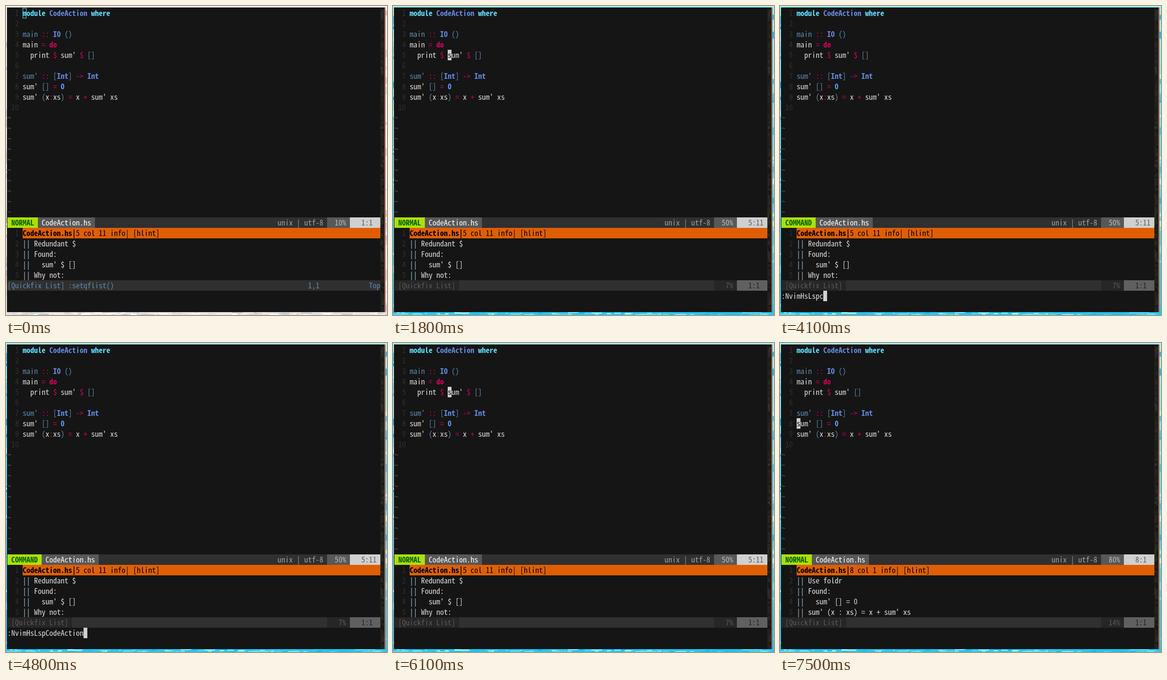
An HTML page with a canvas for the animation above (8 s loop, 801 px wide and 649 px high).

```html
<!DOCTYPE html>
<html lang="en">
<head>
<meta charset="utf-8">
<title>Code action in a terminal editor</title>
<style>
  html, body { margin: 0; width: 100%; height: 100%; overflow: hidden; background: #151515; }
  canvas { display: block; }
</style>
</head>
<body>
<canvas id="screen" width="801" height="649"></canvas>
<script>
const ctx = document.getElementById('screen').getContext('2d');
const LOOP = 8000, CELL_W = 8, CELL_H = 22, LEFT = 3, TOP = 4, COLS = 98;
const FAMILY = '"Noto Sans Mono CJK JP", "Noto Sans Mono", monospace';
const BG = '#151515', FG = '#dcdcdc', BAR = '#303030';

// Pick the font size whose advance equals one cell.
ctx.font = `100px ${FAMILY}`;
const fontSize = 100 * CELL_W / ctx.measureText('0').width;

// Token styles: [colour, bold]
const STYLES = {
  w: [FG], k: ['#5fdfff', true], T: ['#6488dc', true], s: ['#5f87af'],
  o: ['#d7005f'], d: ['#d7005f', true], n: ['#5f9fff', true]
};

// Each line alternates style key and text.
const codeLines = edited => [
  ['k', 'module ', 'T', 'CodeAction', 'k', ' where'],
  [],
  ['s', 'main ', 'o', ':: ', 'T', 'IO', 's', ' ()'],
  ['w', 'main ', 'o', '= ', 'd', 'do'],
  ['w', '  print ', 'o', '$', 'w', " sum' ", ...(edited ? [] : ['o', '$ ']), 's', '[]'],
  [],
  ['s', "sum' ", 'o', ':: ', 's', '[', 'T', 'Int', 's', '] ', 'o', '-> ', 'T', 'Int'],
  ['w', "sum' ", 's', '[] ', 'o', '= ', 'n', '0'],
  ['w', "sum' ", 's', '(', 'w', 'x', 'o', ':', 'w', 'xs', 's', ') ',
   'o', '= ', 'w', 'x ', 'o', '+ ', 'w', "sum' xs"],
  []
];

const HINTS = [
  ['5 col 11 info| [hlint]', 'Redundant $', 'Found:', "  sum' $ []", 'Why not:'],
  ['8 col 1 info| [hlint]', 'Use foldr', 'Found:', "  sum' [] = 0", "sum' (x : xs) = x + sum' xs"]
];

const PROMPT = 'Type number and <Enter> or click with mouse (empty cancels): ';
const COMMAND = ':NvimHsLspCodeAction';

// Each step overrides parts of the state before it.
const STEPS = [
  [0, { wall: 0, hollow: true, window: 'code', mode: 'NORMAL', pct: '10%', pos: '1:1', cursor: [4, 0],
        hints: 0, listPct: '7%', rawBar: true, edited: false, cmd: '', keys: '', answer: null }],
  [600, { wall: 0.5, hollow: false }],
  [700, { wall: 1 }],
  [1400, { keys: '^W' }],
  [1500, { keys: '^Wj' }],
  [1600, { keys: '', window: 'list', rawBar: false, cursor: [4, 21] }],
  [1800, { window: 'code', pct: '50%', pos: '5:11', cursor: [14, 4] }],
  [2200, { mode: 'COMMAND', cmd: ':', cursor: null }],
  [2400, { cmd: ':N' }],
  [3100, { cmd: ':NvimHsLspc' }],
  [3400, { cmd: ':NvimHsLspco' }],
  [4100, { cmd: ':NvimHsLspc' }],
  [4400, { cmd: ':NvimHsLsp' }],
  [4500, { cmd: ':NvimHsLspC' }],
  [4600, { cmd: ':NvimHsLspCo' }],
  [4800, { cmd: COMMAND }],
  [5000, { answer: '' }],
  [5800, { answer: '1' }],
  [6100, { answer: null, cmd: '', mode: 'NORMAL', cursor: [14, 4] }],
  [6200, { edited: true, pos: '5:3', cursor: [6, 4] }],
  [6600, { hints: 1, listPct: '14%', rawBar: true }],
  [7100, { keys: 's' }],
  [7300, { keys: '', window: 'list', rawBar: false, cursor: [4, 21] }],
  [7500, { window: 'code', pct: '80%', pos: '8:1', cursor: [4, 7] }]
];
const states = [];
for (const [, change] of STEPS) states.push({ ...states.at(-1), ...change });

let cells = new Map();
const cellX = col => LEFT + col * CELL_W;
const cellY = row => TOP + row * CELL_H;

function rect(x, y, w, h, color) {
  ctx.fillStyle = color;
  ctx.fillRect(x, y, w, h);
}

function put(col, row, text, fg = FG, bg = null, bold = false) {
  if (bg) rect(cellX(col), cellY(row), text.length * CELL_W, CELL_H, bg);
  ctx.font = `${bold ? 'bold ' : ''}${fontSize}px ${FAMILY}`;
  ctx.fillStyle = fg;
  ctx.fillText(text, cellX(col), cellY(row) + 17);
  [...text].forEach((ch, i) => cells.set(`${col + i},${row}`, [ch, fg, bg || BG, bold]));
  return col + text.length;
}

const fillRow = (row, color, from = 0) => put(from, row, ' '.repeat(COLS - from), FG, color);

function drawCursor([col, row], hollow) {
  const [ch, fg, bg, bold] = cells.get(`${col},${row}`) || [' ', '#d0d0d0', BG, false];
  if (hollow) {
    ctx.strokeStyle = fg;
    ctx.lineWidth = 1;
    ctx.strokeRect(cellX(col) + 0.5, cellY(row) + 0.5, CELL_W - 1, CELL_H - 1);
  } else {
    put(col, row, ch, bg, fg === FG ? '#d0d0d0' : fg, bold);
  }
}

function seeded(seed) {
  return () => (seed = (seed * 16807) % 2147483647) / 2147483647;
}

// Desktop showing around the terminal.
function drawWallpaper(top, bottom, streaks, seed) {
  const rnd = seeded(seed);
  const pick = () => streaks[Math.floor(rnd() * streaks.length)];
  const fade = ctx.createLinearGradient(0, 0, 0, 649);
  fade.addColorStop(0, top);
  fade.addColorStop(1, bottom);
  rect(0, 0, 801, 649, fade);
  for (let i = 0; i < 110; i++) {
    rect(rnd() * 801, 643 + rnd() * 5, 4 + rnd() * 20, 1 + rnd() * 2, pick());
    if (i % 4 === 0) {
      rect(0, rnd() * 649, 2, 3 + rnd() * 14, pick());
      rect(798, rnd() * 649, 3, 3 + rnd() * 14, pick());
    }
  }
}

function drawDesktop(wall) {
  drawWallpaper('#fdfdfd', '#eeeae8', ['#ffffff', '#d8d4d4', '#c4c8cc', '#e4d0cc', '#cfe4e8'], 71);
  ctx.globalAlpha = wall;
  if (wall) drawWallpaper('#9ffcff', '#22c8f6', ['#00bff3', '#6ee4fb', '#b9f8ff', '#35cdf5'], 29);
  ctx.globalAlpha = 1;

  const rnd = seeded(13);
  rect(787, 3, 8, 640, '#231f1b');
  for (let y = 3; y < 640; y += 5) {
    const v = 18 + rnd() * 28;
    rect(787 + rnd() * 4, y, 2 + rnd() * 4, 3 + rnd() * 5, `rgb(${v + 6},${v + 2},${v - 4})`);
  }
  rect(787, 430, 4, 30, '#26301a');
  rect(795, 3, 3, 640, '#a9695a');
  rect(795, 3, 1, 640, '#54372f');
  rect(2, 3, 785, 640, BG);
}

function drawCode(edited) {
  codeLines(edited).forEach((line, row) => {
    put(0, row, String(row + 1).padStart(3), '#303030');
    let col = 4;
    for (let i = 0; i < line.length; i += 2) {
      const [color, bold] = STYLES[line[i]];
      col = put(col, row, line[i + 1], color, null, bold);
    }
  });
  for (let row = 10; row < 20; row++) put(0, row, '~', '#626262');
}

function drawHints([place, ...notes]) {
  put(0, 21, '  1', '#303030');
  fillRow(21, '#df5f00', 4);
  put(put(4, 21, 'CodeAction.hs|', '#000000', '#df5f00', true), 21, place, '#000000', '#df5f00');
  notes.forEach((note, i) => {
    put(0, 22 + i, String(i + 2).padStart(3), '#303030');
    put(4, 22 + i, '||', '#afd7e8');
    put(7, 22 + i, note);
  });
}

// A null mode draws the bar of an unfocused window.
function drawBar(row, name, pct, pos, mode) {
  fillRow(row, BAR);
  const dim = ['#585858', '#262626'];
  let col = 0;
  if (mode) {
    col = put(0, row, ` ${mode} `, '#005f00', '#afdf00', true);
    put(71, row, 'unix | utf-8', '#9e9e9e', BAR);
  }
  put(col, row, ` ${name} `, ...(mode ? ['#ffffff', '#585858'] : dim));
  put(84, row, ` ${pct.padStart(4)} `, ...(mode ? ['#bcbcbc', '#585858'] : dim));
  put(90, row, `   ${pos}`.padEnd(8), ...(mode ? ['#606060', '#d0d0d0'] : ['#262626', '#606060']));
}

function drawRawBar() {
  const color = '#5f87af';
  fillRow(26, BAR);
  put(0, 26, '[Quickfix List] :setqflist()', color, BAR);
  put(79, 26, '1,1', color, BAR);
  put(95, 26, 'Top', color, BAR);
}

function drawPrompt(answer) {
  rect(2, cellY(24), 785, 5 * CELL_H, BG);
  fillRow(24, BAR);
  [COMMAND, '1. Apply hint:Redundant $', "2. Case split on sum'", PROMPT + answer]
    .forEach((text, i) => put(0, 25 + i, text));
  rect(cellX(PROMPT.length + answer.length), cellY(28), CELL_W, CELL_H, '#d0d0d0');
}

function draw(s) {
  cells = new Map();
  drawDesktop(s.wall);
  drawCode(s.edited);
  drawHints(HINTS[s.hints]);
  drawBar(20, 'CodeAction.hs', s.pct, s.pos, s.window === 'code' ? s.mode : null);
  if (s.rawBar) drawRawBar();
  else drawBar(26, '[Quickfix List]', s.listPct, '1:1', s.window === 'list' ? s.mode : null);
  put(87, 28, s.keys);
  if (s.answer !== null) {
    drawPrompt(s.answer);
  } else if (s.cmd) {
    const end = put(0, 27, s.cmd);
    rect(cellX(end), cellY(27), CELL_W, CELL_H, '#d0d0d0');
  }
  if (s.cursor) drawCursor(s.cursor, s.hollow);
}

const start = performance.now();
let shown = -1;
function tick() {
  const t = Math.max(0, performance.now() - start) % LOOP;
  const index = STEPS.findLastIndex(([at]) => at <= t);
  if (index !== shown) draw(states[shown = index]);
  requestAnimationFrame(tick);
}
tick();
</script>
</body>
</html>
```
